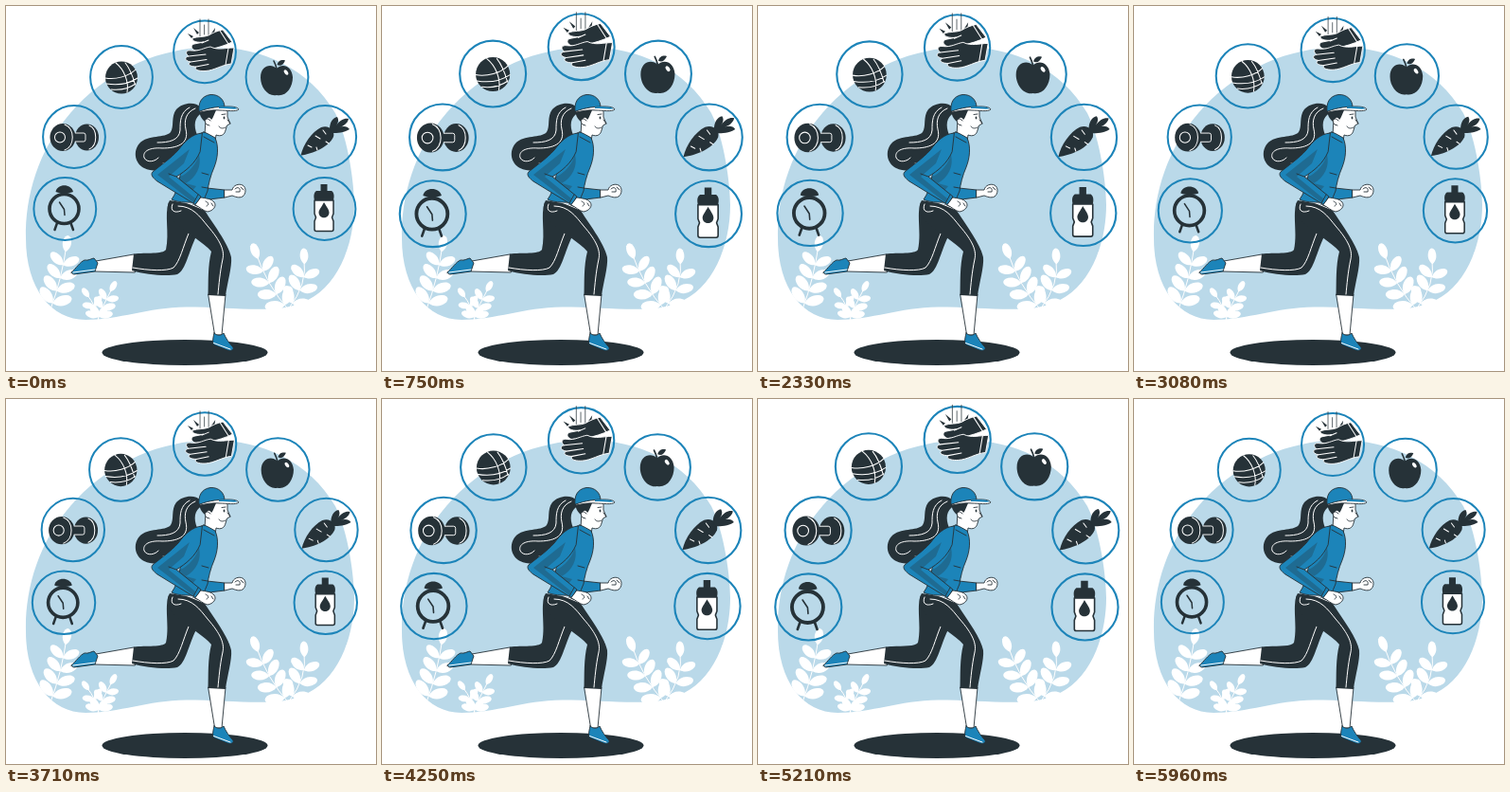
These frames come from a looping animation (391x385 px, 6000 ms). An HTML page:

```html
<!DOCTYPE html>
<html lang="en">
<head>
<meta charset="utf-8">
<title>Healthy habits</title>
<style>
  html, body { margin: 0; width: 100%; height: 100%; overflow: hidden; background: #fff; }
  svg { display: block; width: 100vw; height: 100vh; }
  .dark { fill: #263238; }
  .blue { fill: #1c84b9; }
  .white { fill: #fff; }
  .shade { fill: #263238; opacity: .3; }
  .ink { stroke: #263238; stroke-width: .9; stroke-linejoin: round; stroke-linecap: round; }
  .line { fill: none; stroke: #263238; stroke-width: .9; stroke-linecap: round; stroke-linejoin: round; }
  .chalk { fill: none; stroke: #fff; stroke-width: 1; stroke-linecap: round; stroke-linejoin: round; }
  .edged { stroke: #fff; stroke-width: .9; stroke-linejoin: round; }
  .ring { fill: none; stroke: #1c84b9; stroke-width: 2; }
</style>
</head>
<body>
<svg viewBox="0 0 391 385" xmlns="http://www.w3.org/2000/svg">
  <path fill="#bad9e9" d="M21 245C20 201 34 152 68 113C104 71 155 47 205 44C262 40 318 62 348 113C362 141 368 188 368 210C368 252 350 300 312 313C286 325 240 317.500 190 317.500C150 318 120 331 84 331C48 331 21 298 21 245Z"/>
  <g id="plants"></g>
  <ellipse class="dark" cx="189" cy="365.500" rx="87.500" ry="13.500"/>

  <g id="runner">
    <!-- ponytail -->
    <path class="dark" d="M206 107C200 100 186 102 180 109C174 117 178 127 174 133C168 140 150 135 141 145C134 153 136 166 146 171C158 177 178 172 189 165C199 157 205 147 202 136C198 126 199 117 207 113Z"/>
    <path class="chalk" d="M200 108C190 112 188 121 190 130C194 146 180 150 165 150C152 149 144 153 146 160C149 166 158 164 161 160M194 107C184 112 184 122 184 131C183 142 172 144 160 144M198 142C196 156 180 163 166 166"/>

    <!-- far arm -->
    <path class="blue ink" d="M203 191L231 194L231 202L207 205Z"/>
    <path class="white ink" d="M231 194L239 194C240 189 246 187 250 189C254 191 254 198 250 201C246 203 242 201 239 200L231 202Z"/>
    <path class="line" d="M242 193C245 190 248 192 247 196L243 196M248 191L251 194"/>

    <!-- rear leg -->
    <path class="white ink" d="M135 262L95 269L94 280L136 281Z"/>
    <path class="blue ink" d="M69 281C74 277 78 270 83 268C87 269 91 266 93 266L97 271L94 280L72 283Z"/>
    <path class="chalk" d="M71 281L94 278"/>
    <path class="dark" d="M172 207C167 220 173 239 169 257C166 262 148 260 135 261.500L133 279C149 284 171 285 181 283C190 279 193 259 201 243L205 215Z"/>
    <path class="chalk" d="M134 276C151 279 170 280 177 276C184 269 187 254 193 240"/>

    <!-- front leg -->
    <path class="white ink" d="M214 304L232 304L228 347L221 347Z"/>
    <path class="blue ink" d="M220 345C223 348 227 348 230 345C232 350 236 356 240 360C241 363 238 364 234 363L219 357C218 353 219 349 220 345Z"/>
    <path class="chalk" d="M219.500 355.500L237 362"/>
    <path class="dark" d="M173 205C168 213 172 222 178 228C190 239 210 250 217 259C213 274 214 292 213.500 305L232 306C234 291 239 275 238 265C235 250 218 229 207 211Z"/>
    <path class="chalk" d="M176 209C173 216 178 219 185 216M182 211C197 211 205 222 213 232C227 248 231 258 229 267C226 281 225 294 224 304M190 207L207 214"/>

    <!-- neck and head -->
    <path class="white ink" d="M211 118L210 137L221 143L222 136C227 138 231 136 232 131L233.500 126L237 124L234 117L234 109L212 109Z"/>
    <path class="dark" d="M205 110L222 110C220 114 219 118 217 120C215 116 211 118 212 123L209 121C206 118 204 114 205 110Z"/>
    <path class="white ink" d="M216 121C212 116 208 121 212 125L215 126"/>
    <path class="line" d="M228 114.500L232 114M225 127C227 130 230 129 232 128M234 120L237 124"/>
    <ellipse class="dark" cx="230.500" cy="118" rx=".9" ry="1.400"/>
    <path class="blue ink" d="M204 111C203 103 206 95 216 93.500C225 93 231 99 231 107L222 108Z"/>
    <path class="white ink" d="M205 111C215 107 226 106 235 106C241 106 245 107 246 109C243 112 233 110 226 110C218 109 211 111 205 112Z"/>
    <path class="blue" d="M225 106.500C234 105.500 242 106 245 108.500C239 109 232 108 225 108Z"/>

    <!-- shirt -->
    <path class="blue ink" d="M209 133C213 134 217 137 221 139C225 148 224 160 220 170C216 179 214 188 213 195L208 207C196 207 182 208 175 204C183 193 183 181 186 169C189 153 198 136 209 133Z"/>
    <path class="shade" d="M204 157C199 171 189 179 181 181L196 196L201 190L190 187C201 181 207 169 204 157Z"/>
    <path class="line" d="M209 138L220 144M213 192L207 191M214 178L207 176"/>

    <!-- near arm -->
    <path class="blue ink" d="M207 134C196 135 189 143 182 152C174 161 162 169 155 175C152 178 156 182 160 185L201 210L206 201L180 180C190 174 200 166 205 154Z"/>
    <path class="shade" d="M160 178L194 151L188 166L172 180L200 203L199 208Z"/>
    <path class="line" d="M180 180L172 177M198 208L203 199"/>
    <path class="white ink" d="M206 202C211 203 217 203 220 207C223 211 219 216 213 217C208 216 205 212 200 210Z"/>
    <path class="line" d="M211 206C214 207 215 210 212 211M217 208L219 211"/>
  </g>

  <g id="habits">
    <g id="rings"></g>

    <!-- alarm clock -->
    <path class="dark" d="M52.500 196C54 187 69 187 71 196C65 198 58 198 52.500 196Z"/>
    <circle class="line" cx="61.500" cy="214" r="15.500" style="stroke-width:3.600"/>
    <path class="line" d="M54 229L51.500 236M68.500 229L71 236" style="stroke-width:2.500"/>
    <path class="line" d="M56.500 207L61.500 214.500L62 220.500" style="stroke-width:1.500"/>

    <!-- dumbbell -->
    <ellipse class="dark" cx="85.500" cy="138.500" rx="12.500" ry="14"/>
    <path class="chalk" d="M88 126C97 130 97 147 88 151"/>
    <rect class="dark edged" x="68" y="134" width="16" height="9" rx="2"/>
    <ellipse class="dark" cx="60" cy="138.500" rx="13.500" ry="14.500"/>
    <path class="chalk" d="M62 125C73 129 73 148 62 152"/>
    <circle class="chalk" cx="57" cy="138.500" r="5.500"/>

    <!-- basketball -->
    <circle class="dark" cx="122" cy="75.500" r="17"/>
    <path class="chalk" d="M105 76C116 78 130 74 137 67M116 60C125 67 130 80 128 91M126 60C131 66 134 74 136.500 83M106 82C118 84 130 82 139 76M111 88C120 89 130 87 137 82"/>

    <!-- hand washing -->
    <path class="line" d="M205 14V32M209.500 20V30M214 14V32" style="stroke-width:.7"/>
    <path class="dark" d="M196 34L192 29L198 32ZM202 30L198 23L204 28ZM217 29L221 23L220 30Z"/>
    <path class="dark edged" d="M229 25L239 38C231 42 223 44 215 46L200 47C195 45 195 41 199 40L209 38C202 39 196 37 197 34C203 32 209 33 214 31C219 28 224 26 229 25Z"/>
    <path class="dark edged" d="M241 44L238 61C228 62 220 68 211 68.500C204 69 198 67 201 64C194 64 191 61 195 59C189 58 188 54 193 53C189 50 190 46 196 47C204 48 209 44 216 43C224 47 232 44 241 44Z"/>
    <path class="chalk" d="M193 53L211 51M195 59L212 56.500M201 64L214 61.500M226 26L235 40M235 44.500L232 62M207 39L214 36"/>

    <!-- apple -->
    <path class="dark" d="M286 66C280 60 269 63 269 75.500C269 86 277 96 286 94C296 96 303 86 303 75C302 63 292 60 286 66Z"/>
    <path class="line" d="M286 66C285 62 284 60 283 58" style="stroke-width:1.600"/>
    <path class="dark" d="M286.500 62C288 57 292 56.500 295 57.500C293 62 290 64 286.500 62Z"/>
    <ellipse class="white" cx="296" cy="70" rx="1.800" ry="3" transform="rotate(-35 296 70)"/>

    <!-- carrot -->
    <path class="dark" d="M311.500 157.500C314 146 323 133 333 128C341 125 348 131 346 138C341 149 324 156 311.500 157.500Z"/>
    <path class="dark" d="M342 130C342 123 345 118 350 117C352 120 351 123 349 126C353 120 358 118 362 119C361 124 356 127 352 128C357 126 361 127 363 130C357 134 350 134 345 134Z"/>
    <path class="chalk" d="M327 137L332 140M335 131L338 135M319 147L323 149M338 143L341 145M328 149L329 152"/>

    <!-- bottle -->
    <path class="dark" d="M332.500 188H339.500V195H344C347 197 347 201 346 205H326C325 201 325 197 328 195H332.500Z"/>
    <path class="white ink" d="M326 205H346V219L344.500 223L346 227V235.500Q346 237.500 344 237.500H328Q326 237.500 326 235.500V227L327.500 223L326 219Z" style="stroke-width:1.500"/>
    <path class="dark" d="M336 207C339 212 341.500 215 341.500 218C341 225 331 225 330.500 218C330.500 215 333.500 212 336 207Z"/>
  </g>
</svg>
<script>
const LOOP = 6000;
const CENTER = { x: 199.5, y: 130.5 };
const NS = 'http://www.w3.org/2000/svg';
const byId = id => document.getElementById(id);

function add(parent, tag, attrs) {
  const node = document.createElementNS(NS, tag);
  for (const key in attrs) node.setAttribute(key, attrs[key]);
  parent.appendChild(node);
}

// A curved stem with leaf pairs that shrink towards the tip.
function plant([x0, y0], [cx, cy], [x1, y1], pairs, size) {
  const group = byId('plants');
  add(group, 'path', { class: 'chalk', d: `M${x0} ${y0}Q${cx} ${cy} ${x1} ${y1}` });
  const leaf = (x, y, angle, k) => add(group, 'path', {
    class: 'white',
    d: 'M0 0C4 -3 6 -9 3 -15Q0 -19 -3 -15C-6 -9 -4 -3 0 0Z',
    transform: `translate(${x} ${y}) rotate(${angle}) scale(${k})`
  });
  for (let i = 0; i <= pairs; i++) {
    const u = 0.1 + 0.8 * i / pairs, v = 1 - u;
    const x = v * v * x0 + 2 * v * u * cx + u * u * x1;
    const y = v * v * y0 + 2 * v * u * cy + u * u * y1;
    const dx = v * (cx - x0) + u * (x1 - cx);
    const dy = v * (cy - y0) + u * (y1 - cy);
    const heading = Math.atan2(dx, -dy) * 180 / Math.PI;
    const k = size * (1 - 0.2 * u);
    if (i === pairs) leaf(x, y, heading, k);
    else for (const side of [-1, 1]) leaf(x, y, heading + side * 56, k);
  }
}

plant([47, 320], [59, 288], [64, 252], 4, 1.25);
plant([98, 331], [95, 316], [86, 305], 2, 0.85);
plant([97, 331], [103, 314], [112, 298], 3, 0.9);
plant([299, 321], [275, 294], [264, 260], 4, 1.25);
plant([299, 319], [319, 293], [315, 267], 3, 1.2);

for (const [cx, cy] of [[62.3, 214], [72, 138], [122, 75], [210, 48.3], [286.5, 75], [337.2, 138], [336.5, 214]])
  add(byId('rings'), 'circle', { class: 'ring', cx, cy, r: 32.9 });

// Linear swell: quick up, slow down, then quick up and down again.
const PULSE = [[0, 1], [0.2, 1.1], [0.6, 1], [0.8, 1.1], [1, 1]];

function pulse(p) {
  const i = PULSE.findIndex(([at]) => at > p);
  const [a, from] = PULSE[i - 1], [b, to] = PULSE[i];
  return from + (to - from) * (p - a) / (b - a);
}

function draw(ms) {
  const s = pulse((ms % LOOP) / LOOP);
  byId('habits').setAttribute('transform',
    `translate(${CENTER.x} ${CENTER.y}) scale(${s}) translate(${-CENTER.x} ${-CENTER.y})`);
}

const start = performance.now();
function tick() {
  draw(performance.now() - start);
  requestAnimationFrame(tick);
}
tick();
</script>
</body>
</html>
```
